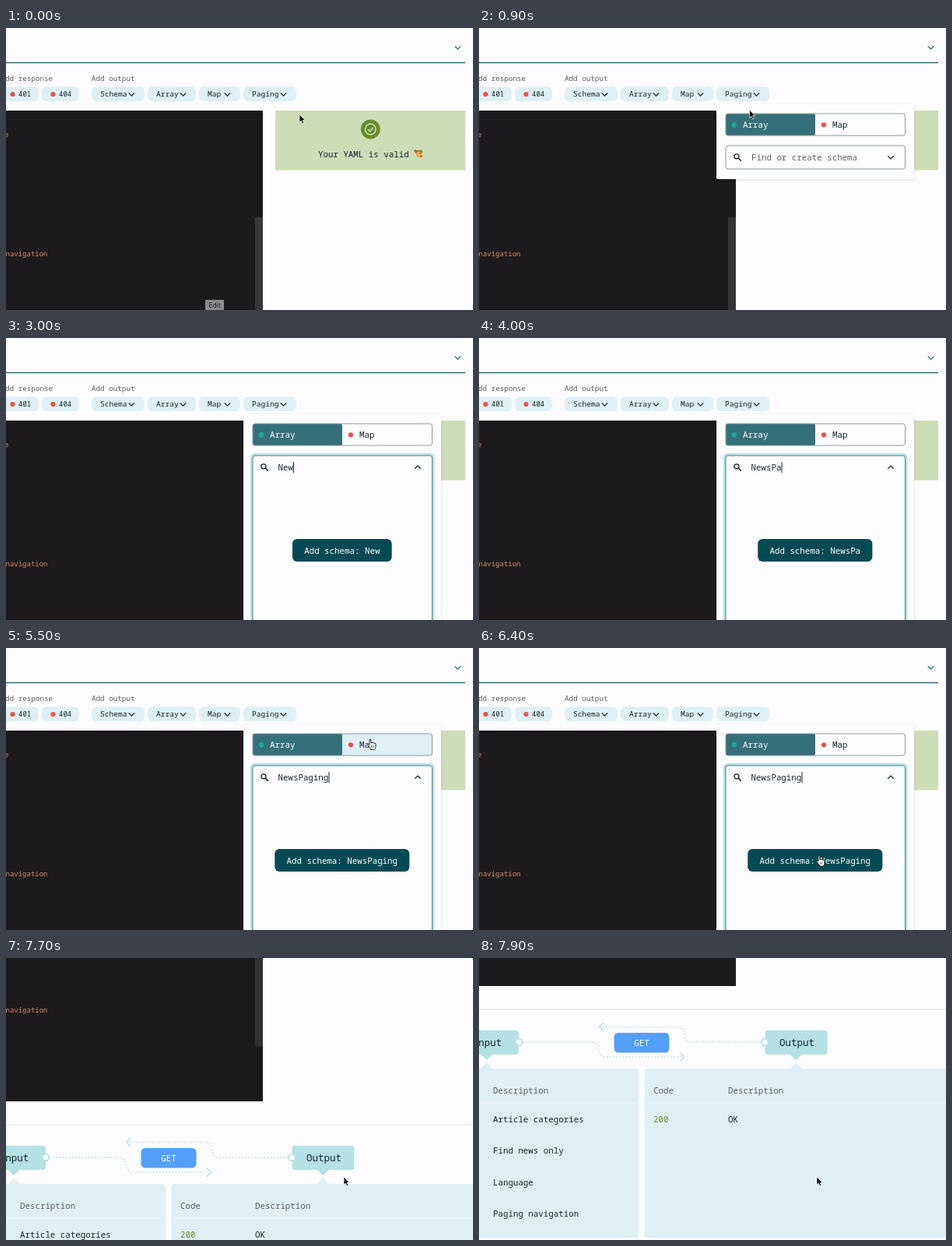
Animation of 600x362 px, one loop 8 s. Source, as an HTML page:

```html
<!DOCTYPE html>
<html lang="en">
<head>
<meta charset="utf-8">
<title>YAML editor</title>
<style>
html, body { margin: 0; width: 100%; height: 100%; overflow: hidden; background: #fdfcfe; }
svg { display: block; width: 600px; height: 362px; }
text { font-family: 'Roboto Mono', 'Noto Sans Mono', monospace; white-space: pre; }
</style>
</head>
<body>
<svg id="stage" viewBox="0 0 600 362"></svg>
<script>
const stage = document.getElementById('stage');
const LOOP = 8000, STEP = 100;
const INK = '#13262c', GREY = '#5b5d61', PALE = '#dff0f4', AQUA = '#b5e1e4', PAPER = '#fdfcfe';
const WORD = 'NewsPaging';
const KEY_TIMES = [2400, 2700, 2900, 3200, 3600, 3900, 4200, 4300, 4500, 4700];
const OPEN = 500, FOCUS = 1900, CLOSE = 6700;

// time, x, y of the pointer tip
const POINTER = [[0, 377, 111], [100, 377, 111], [400, 345, 86], [600, 345, 86], [1500, 355, 160],
  [1600, 356, 163], [4800, 356, 163], [5500, 468, 117], [6600, 434, 281], [8000, 434, 281]];
const SCROLL = [[7400, 0], [7500, 28], [7600, 115], [7700, 223], [7800, 312], [7900, 371]];

// Values at time t between key points, with optional smoothing
function at(keys, t, smooth) {
  const i = keys.findIndex(k => k[0] > t);
  if (i === 0) return keys[0].slice(1);
  if (i < 0) return keys[keys.length - 1].slice(1);
  const a = keys[i - 1], b = keys[i];
  let p = (t - a[0]) / (b[0] - a[0]);
  if (smooth) p = p * p * (3 - 2 * p);
  return a.slice(1).map((v, j) => v + (b[j + 1] - v) * p);
}

const rect = (x, y, w, h, fill, r = 0, more = '') =>
  `<rect x="${x}" y="${y}" width="${w}" height="${h}" rx="${r}" fill="${fill}" ${more}/>`;
const dot = (x, y, r, fill, more = '') => `<circle cx="${x}" cy="${y}" r="${r}" fill="${fill}" ${more}/>`;
const line = (d, color, w = 1, more = '') =>
  `<path d="${d}" fill="none" stroke="${color}" stroke-width="${w}" ${more}/>`;
const fill = (d, color, more = '') => `<path d="${d}" fill="${color}" ${more}/>`;
const chevron = (x, y, color, dir = 1) => line(`M${x - 3.7} ${y - 1.8 * dir}l3.7 3.7 3.7 ${-3.7 * dir}`
  .replace('l3.7 3.7', `l3.7 ${3.7 * dir}`), color, 1.3);
// y is the middle of the capitals
const text = (x, y, s, size = 10.8, color = INK, weight = 400, anchor = 'start') =>
  `<text x="${x}" y="${y + size * .36}" font-size="${size}" fill="${color}" font-weight="${weight}" text-anchor="${anchor}">${s}</text>`;

function toolbar() {
  const menu = (x, w, label) => rect(x, 75.5, w, 18.5, PALE, 6) +
    text(x + 11, 85, label, 9.6, INK, 500) + chevron(x + w - 16.5, 85.2, INK);
  const status = (x, code) => rect(x, 75.5, 48, 18.5, PALE, 6) + dot(x + 14.5, 85, 3.1, '#ef4e4e') +
    text(x + 22, 85, code, 9, INK, 500);
  return line('M0 44.5H590', '#2f7178', 1.5) + chevron(580.5, 25.3, '#2f7178') +
    text(-6.5, 64.5, 'Add response', 9.25, GREY) + text(110, 64.5, 'Add output', 9.25, GREY) +
    status(-6, '401') + status(46, '404') + menu(110, 68, 'Schema') + menu(182, 62, 'Array') +
    menu(248, 53, 'Map') + menu(305, 68, 'Paging');
}

function editor(t) {
  const late = t >= CLOSE;
  const code = '#d98a68';
  const thumb = !late ? '#383738' : t < 7100 ? '#211f21' : '#323132';
  return rect(-5, 106, 335, 301, '#1c1a1c') +
    rect(320, late ? 211 : 243, 10, 126, thumb) + (late ? rect(320, 105.5, 10, 1.5, '#5a585c') : '') +
    text(3.5, 137, 'e', 9, code, 400, 'end') + text(53.5, 289.5, 'navigation', 9, code, 400, 'end') +
    (t < 200 ? rect(256, 349, 24, 14, '#8d8c8e') +
      `<text x="268" y="359" font-size="9" text-anchor="middle" fill="#222" style="font-family:Roboto,sans-serif">Edit</text>` : '');
}

function verdict(t) {
  if (t >= CLOSE) {
    const drum = rect(418.5, 123, 9, 7, '#c9303a', 2) + line('M419 129l2-4 2 4 2-4 2 4', '#e9c9b0', .7) +
      `<ellipse cx="423" cy="123.5" rx="4.6" ry="1.8" fill="#eee" stroke="#999" stroke-width=".6"/>` +
      line('M418 120l5 3M428 120l-5 3', '#9b6b4a');
    return text(346, 125, 'Validating') + drum + text(434, 125, 'your YAML ...');
  }
  const party = fill('M524 157l5 9 6-6-4-3z', '#e0483f') + fill('M525 160l6 7 2-5z', '#f0b93a') +
    dot(533, 158.5, 2.2, '#7a9a35') + dot(526, 157.5, 1.5, '#5f8f3c') + dot(530, 160, 1.6, '#f3cf5c') +
    dot(533.5, 164.5, 1.5, '#d85a3a');
  return rect(346, 106, 244, 76.5, '#cedcb8') + dot(468.3, 130, 12.4, '#688c2b') +
    dot(468.3, 130, 6.8, 'none', 'stroke="#eef4e2" stroke-width="1.2"') +
    line('M465 130.2l2.4 2.4 4.3-4.6', '#eef4e2', 1.3) + text(401, 162.5, 'Your YAML is valid') + party;
}

function diagram() {
  const box = (x, w, label, labelX, tip) => rect(x, 464, w, 31, AQUA, 4) + text(labelX, 479.5, label, 12.5, INK, 500) +
    fill(`M${tip - 8} 494.5h16l-8 7.5z`, AQUA) + fill(`M${tip - 8} 513.5l8-8 8 8z`, PALE);
  const pin = x => dot(x, 479, 4.3, PAPER, `stroke="${AQUA}" stroke-width="1.8"`);
  const wire = d => line(d, '#b9e0e5', 1.5, 'stroke-dasharray="1.5 2.6"');
  const head = y => text(18, y, 'Description', 10.8, GREY) + text(224, y, 'Code', 10.8, GREY) +
    text(320, y, 'Description', 10.8, GREY);
  const rows = ['Article categories', 'Find news only', 'Language', 'Paging navigation'];
  return line('M0 437H600', '#e4e3e6') +
    wire('M56 479H145C158 479 149 498 164 498H262') + wire('M362 479H274C258 479 271 459.5 254 459.5H156') +
    line('M258 492.5l5.5 5.5-5.5 5.5M160 454l-5.5 5.5 5.5 5.5', AQUA, 1.4) +
    rect(173.5, 467, 71, 25.5, '#539ffa', 5.5) + text(209, 480, 'GET', 10.8, '#fff', 500, 'middle') +
    box(-30, 81, 'Input', -8.3, 10) + box(367.5, 80, 'Output', 386, 407.5) + pin(51) + pin(367.5) +
    rect(-20, 513, 225, 217, PALE, 4) + rect(212.5, 513, 400, 217, PALE, 4) +
    line('M0 557H201M216 557H600', '#f3f9fb') + head(541.5) +
    rows.map((s, i) => text(18, 578 + 40.5 * i, s, 10.8, INK, 500)).join('') +
    text(224, 578, '200', 10.8, '#6d8f2c', 500) + text(320, 578, 'OK', 10.8, INK, 500);
}

function popup(t, hoverMap) {
  if (t < OPEN || t >= CLOSE) return '';
  const open = t >= FOCUS;
  const typed = WORD.slice(0, KEY_TIMES.filter(k => k <= t).length);
  const caret = 350 + typed.length * 6.5;
  let s = rect(305, 98, 254, open ? 300 : 96, PAPER, 2, 'style="filter:drop-shadow(0 1px 1.5px #0002)"') +
    rect(317, 110, 230.5, 28, hoverMap ? PALE : PAPER, 3) + rect(317, 110, 115, 28, '#35707a', 2) +
    rect(317, 110, 230.5, 28, 'none', 3, 'stroke="#8b999c"') +
    dot(328, 124.3, 3.4, '#1fa698') + text(339, 124.3, 'Array', 10.8, '#fff', 500) +
    dot(443, 124.3, 3.1, '#ef4e4e') + text(454, 124.3, 'Map', 10.8, INK, 500);
  if (open) s += rect(315.5, 149.5, 233.5, 260, 'none', 4, `stroke="${AQUA}" stroke-width="3"`);
  s += rect(317, 151, 230.5, open ? 260 : 30, PAPER, 3, `stroke="${open ? '#587f87' : '#8b999c'}"`) +
    dot(331, 164.8, 3, 'none', `stroke="${INK}" stroke-width="1.3"`) + line('M333.2 167l3.6 3.6', INK, 1.5) +
    chevron(529, 166, INK, open ? -1 : 1) +
    (typed ? text(349.5, 166.5, typed) : text(350, 166.5, 'Find or create schema', 10.8, '#626569'));
  if (open) s += line(`M${caret} 159v14`, INK);
  if (typed) {
    const label = 'Add schema: ' + typed, w = label.length * 6.48 + 30.5;
    s += rect(431.8 - w / 2, 258, w, 29, '#044a55', 6) + text(431.8, 272.7, label, 10.8, '#fff', 500, 'middle');
  } else if (open) s += text(431.5, 272.3, 'No schemas yet in spec.', 9.95, GREY, 400, 'middle');
  return s;
}

function pointer(t, x, y) {
  if (t >= KEY_TIMES[0] && t < 4900) return '';
  const within = (l, r, top, bottom) => x > l && x < r && y > top && y < bottom;
  const shown = t >= OPEN && t < CLOSE;
  let s;
  if (shown && within(317, 547, 151, 181)) {
    s = line('M-2.5-6.5q2.5 0 2.5 2v9q0 2-2.5 2M2.5-6.5Q0-6.5 0-4.5M0 4.5q0 2 2.5 2M-1.5 1h3', '#111', 1.2);
  } else if (within(305, 373, 75, 94) || shown && (within(317, 547, 110, 138) || within(345, 518, 258, 287))) {
    s = fill('M-1 1q1-2 2 0v4q1-1.5 2 0 1-1 2 .4 1.8-.8 2 1v3q0 3-2 4H1q-1-2-4-5.5-.5-2 1-1.5l1 1z', '#fff',
      'stroke="#222" stroke-width="1" stroke-linejoin="round"') + line('M1.5 8v3M3.5 8v3', '#222', .7);
  } else {
    s = fill('M0 0v10.2l2.3-2.1 1.7 3.7 1.8-.8-1.7-3.6h3.2z', '#080808', 'stroke="#fff" stroke-width=".7"');
  }
  return `<g transform="translate(${x} ${y})">${s}</g>`;
}

function draw(t) {
  const [x, y] = at(POINTER, t, true), [scroll] = at(SCROLL, t);
  const hoverMap = x > 432 && x < 547 && y > 110 && y < 138;
  stage.innerHTML = rect(0, 0, 600, 362, PAPER) +
    `<g transform="translate(0 ${-scroll})">${toolbar() + editor(t) + verdict(t) + diagram() + popup(t, hoverMap)}</g>` +
    pointer(t, x, y);
}

let last = -1;
function tick() {
  const t = Math.floor(performance.now() % LOOP / STEP) * STEP;
  if (t !== last) draw(last = t);
  requestAnimationFrame(tick);
}
tick();
</script>
</body>
</html>
```
